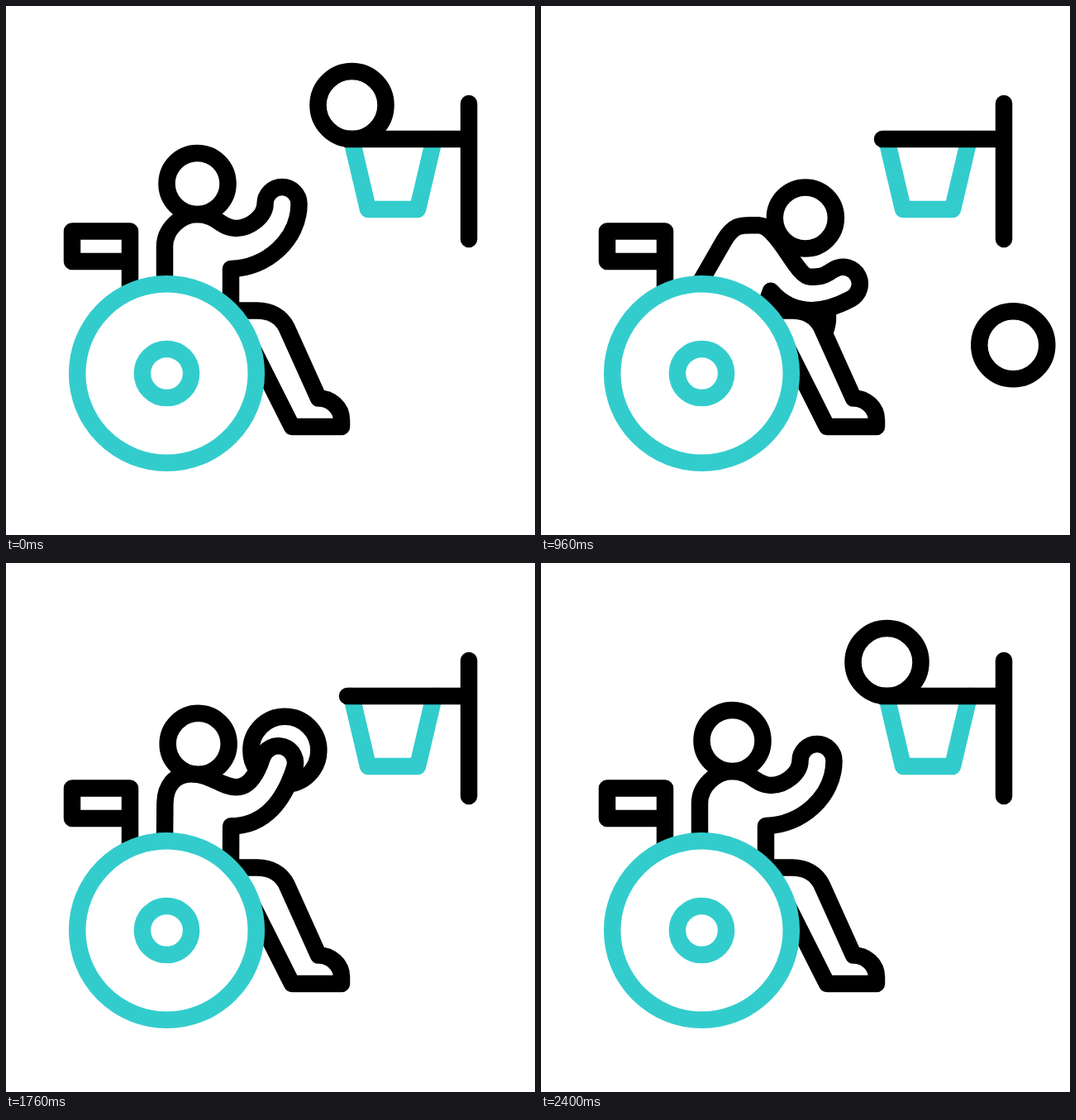
An HTML page for the animation above (3 s loop, 640x640 px).

```html
<!DOCTYPE html>
<html lang="en">
<head>
<meta charset="utf-8">
<title>Wheelchair basketball</title>
<style>
  html, body { margin: 0; width: 100%; height: 100%; overflow: hidden; background: #fff; }
  svg { display: block; width: 100vw; height: 100vh; fill: #fff; stroke: #000; stroke-width: 20.5; stroke-linecap: round; stroke-linejoin: round; }
  .teal { stroke: #33cccc; }
</style>
</head>
<body>
<svg viewBox="0 0 640 640">
  <circle id="held" r="41"/>
  <circle id="loose" r="41"/>
  <path id="net" class="teal"/>
  <path d="M413 161H560M560 118V282"/>
  <path d="M240 368.5H304C320 368.5 333 376 339.500 389L378 474.500C393 474.500 406 486 406 501V509H346L282 382Z"/>
  <path id="torso"/>
  <circle id="head" r="37"/>
  <path d="M150 309H80V272.500H150V345"/>
  <g class="teal">
    <circle cx="194.5" cy="444.5" r="108.3"/>
    <circle cx="194.5" cy="444.5" r="29.6"/>
  </g>
</svg>
<script>
const LOOP = 3000, FRAME = 40, REST = 2400, RELEASE = 2000, BOUNCE = 787;
const HAND_RADIUS = 20.5;
const $ = id => document.getElementById(id);

// Pose: head x y, nape x y, inner shoulder x y, hand x y, hand tilt in degrees
const upright = [231.5, 215, 231, 252, 278, 269, 334, 239.5, 0];
const leaning = [284, 235, 247, 262, 307, 297, 349.5, 294, 39];
const lowest = [329.5, 263, 268, 266, 331, 337, 370, 348, 68];
const lifting = [264, 226.5, 241, 260, 300, 291, 347, 281, 33];
const throwing = [214.5, 215, 213, 252, 265, 260, 318, 218, 7];

const bodyKeys = [
  [220, ...upright], [680, ...leaning], [1120, ...lowest], [1360, ...lowest],
  [1560, ...lifting], [RELEASE, ...throwing], [REST, ...upright]
];
const heldKeys = [
  [760, 215, 430], [960, 306, 377], [1360, 306, 377], [1560, 354, 285], [RELEASE, 315.5, 190.5]
];

// Monotone cubic interpolation of every value in a key list.
function track(keys, t) {
  const last = keys.length - 1;
  t = Math.min(Math.max(t, keys[0][0]), keys[last][0]);
  let i = 0;
  while (i < last - 1 && t >= keys[i + 1][0]) i++;
  const rate = (k, j) => (keys[k + 1][j] - keys[k][j]) / (keys[k + 1][0] - keys[k][0]);
  const slope = (k, j) => {
    if (k === 0 || k === last) return 0;
    const a = rate(k - 1, j), b = rate(k, j);
    return a * b > 0 ? 2 * a * b / (a + b) : 0;
  };
  const span = keys[i + 1][0] - keys[i][0], u = (t - keys[i][0]) / span;
  return keys[i].slice(1).map((from, n) => {
    const j = n + 1, to = keys[i + 1][j];
    return from + (to - from) * u * u * (3 - 2 * u)
      + span * u * (1 - u) * (slope(i, j) * (1 - u) - slope(i + 1, j) * u);
  });
}

function place(id, x, y) {
  $(id).setAttribute('cx', x);
  $(id).setAttribute('cy', y);
}

// Point at a distance along an angle in radians.
const polar = ([x, y], angle, d) => [x + d * Math.cos(angle), y + d * Math.sin(angle)];

function drawBody(t) {
  const [headX, headY, napeX, napeY, dipX, dipY, handX, handY, tilt] = track(bodyKeys, t);
  const lean = (headX - upright[0]) / 89;
  const across = tilt * Math.PI / 180, towardElbow = across + Math.PI / 2;
  const hip = [192 - 4 * lean, 342];
  const back = [192 + 29 * lean, 291 - 6 * lean];
  const backHandle = back.map((v, i) => v + 0.4 * (v - hip[i]));
  const waist = [278 - 6 * (1 - lean) ** 2, 318 + 27 * lean];
  const thumb = polar([handX, handY], across, -HAND_RADIUS);
  const palm = polar([handX, handY], across, HAND_RADIUS);
  const reach = Math.hypot(palm[0] - waist[0], palm[1] - waist[1]);
  const forearm = polar(palm, towardElbow, 0.38 * reach);
  const underarm = polar(waist, 50 * lean * lean * Math.PI / 180, 42);

  place('head', headX, headY);
  $('torso').setAttribute('d', `M${hip}L${back}`
    + `C${backHandle} ${napeX - 20} ${napeY} ${napeX} ${napeY}`
    + `C${napeX + 24} ${napeY} ${dipX - 18} ${dipY} ${dipX} ${dipY}`
    + `S${polar(thumb, towardElbow, 14)} ${thumb}`
    + `A${HAND_RADIUS} ${HAND_RADIUS} 0 0 1 ${palm}`
    + `C${forearm} ${underarm} ${waist}L272 362`);
}

function drawBalls(t) {
  // Drops through the hoop, bounces once and leaves on the right.
  const x = Math.min(473.5, 418.5 + 0.1 * t) + 0.52 * Math.max(0, t - 772);
  const y = t < BOUNCE
    ? 120 + 0.0011 * Math.max(0, t - 192) ** 2
    : 399 + 0.00176 * (t - 1040) ** 2;
  place('loose', x, y);

  // Picked up from behind the wheel, then thrown along a parabola.
  const held = t <= RELEASE
    ? track(heldKeys, t)
    : [315.5 + 0.2575 * (t - RELEASE), 105 + 0.00108 * (t - 2282) ** 2];
  place('held', ...held);
}

function drawNet(t) {
  const phase = Math.min(Math.max((t - 200) / 720, 0), 1);
  const bulge = Math.sin(Math.PI * phase);
  $('net').setAttribute('d',
    `M418 161L${438 - 7 * bulge} ${246 + 32 * bulge ** 3}H${498 + 14 * bulge}L518 161`);
}

function draw(now) {
  const t = Math.min(Math.floor(now % LOOP / FRAME) * FRAME, REST);
  drawBody(t);
  drawBalls(t);
  drawNet(t);
  requestAnimationFrame(draw);
}

draw(0);
</script>
</body>
</html>
```
